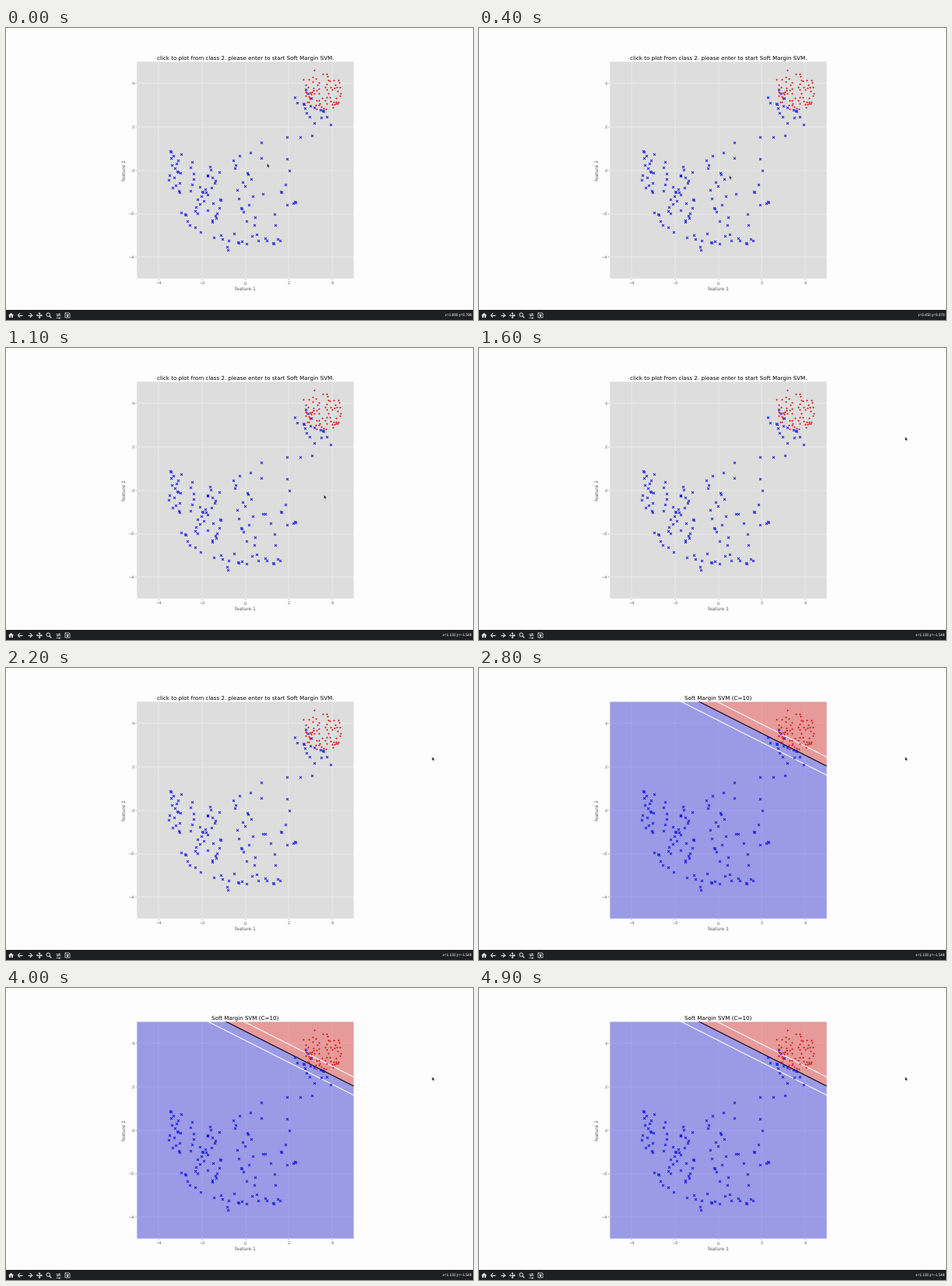
Animation of 600 by 375 pixels, one loop 5000 ms. Source, as a matplotlib script:

```python
import numpy as np
import matplotlib.pyplot as plt
from matplotlib.animation import FuncAnimation
from matplotlib.patches import Circle, Polygon, Rectangle

W, H, DPI = 600, 375, 100
PX = 72 / DPI            # points per pixel
U = 0.495 * PX           # scale of the plot's default font and line sizes
SIDE, LEFT, TOP = 278.74, 168.13, 43.44
UNIT = SIDE / 10
FRAMES, STEP = 50, 100
CLICK, SOLVED = 10, 28
BLUE, RED, GREY = "#0000e0", "#dc0808", "#555555"
ASK = "click to plot from class 2. please enter to start Soft Margin SVM."
RESULT = "Soft Margin SVM (C=10)"

plt.rcParams.update({
    "font.family": "DejaVu Sans",
    "text.hinting": "none",
    "axes.linewidth": U,
    "axes.labelpad": 4 * U,
    "axes.titlepad": 5 * U,
    "xtick.major.size": 3.5 * U, "ytick.major.size": 3.5 * U,
    "xtick.major.pad": 3.5 * U, "ytick.major.pad": 3.5 * U,
    "xtick.major.width": 0.8 * U, "ytick.major.width": 0.8 * U,
})
rng = np.random.default_rng(7)


def to_data(points):
    """Stage pixels to plot coordinates."""
    x, y = np.transpose(points)
    return (x - LEFT) / UNIT - 5, 5 - (y - TOP) / UNIT


def to_stage(x, y):
    return np.array([LEFT + (x + 5) * UNIT, TOP + (5 - y) * UNIT])


def strand(n, start, end, width):
    """Points in even steps along a segment, scattered to both sides."""
    start, end = np.array(start, float), np.array(end, float)
    along = end - start
    side = np.array([-along[1], along[0]]) / np.hypot(*along)
    t = (np.arange(n) + rng.uniform(0.2, 0.8, n)) / n
    off = width * (2 * (rng.permutation(n) + 0.5) / n - 1)
    return start + np.outer(t, along) + np.outer(off, side)


def disc(n, cx, cy, r, gap):
    """Random points in a circle that keep a minimum distance."""
    pts = []
    while len(pts) < n:
        p = rng.uniform(-r, r, 2)
        if np.hypot(*p) < r and all(np.hypot(*(p - q)) > gap for q in pts):
            pts.append(p)
    return np.array(pts) + [cx, cy]


blue = np.vstack([
    strand(17, (217, 156), (217, 210), 8),
    strand(6, (240, 167), (238, 215), 3),
    strand(8, (248, 203), (247, 242), 5),
    strand(6, (223, 234), (250, 265), 3),
    strand(20, (266, 176), (264, 250), 11),
    strand(6, (270, 264), (289, 285), 7),
    strand(12, (290, 269), (356, 274), 7),
    strand(18, (306, 157), (306, 255), 15),
    strand(7, (362, 158), (349, 265), 8),
    strand(16, (373, 85), (410, 118), 13),
    [(328, 147), (328, 167), (330, 213), (369, 225), (371, 223),
     (361, 139.5), (378, 139.5), (393, 137.5), (417, 124)],
])
blue = np.vstack([blue, blue[::8] + [0.8, 1.4]])
clicks = [(333, 213), (340, 225.5)]
red = np.vstack([disc(70, 408, 82, 25, 1.7), [(396, 54), (382, 66)]])

fig = plt.figure(figsize=(W / DPI, H / DPI), dpi=DPI, facecolor="#fdfdfd")
ax = fig.add_axes([LEFT / W, 1 - (TOP + SIDE) / H, SIDE / W, SIDE / H],
                  facecolor="#dddddd")
ticks = range(-4, 5, 2)
ax.set(xlim=(-5, 5), ylim=(-5, 5), xticks=ticks, yticks=ticks)
ax.set_axisbelow(True)
ax.grid(color="white", linewidth=0.8 * U)
ax.tick_params(color=GREY, labelcolor=GREY, labelsize=10 * U)
ax.spines[:].set_color("white")
ax.set_xlabel("feature 1", color=GREY, fontsize=12 * U)
ax.set_ylabel("feature 2", color=GREY, fontsize=12 * U)
title = ax.set_title(ASK, fontsize=14.4 * U)


def scatter(points, marker, color, width):
    return ax.scatter(*to_data(points), s=(6 * U) ** 2, marker=marker,
                      color=color, linewidths=width * U, zorder=3)


scatter(blue, "x", BLUE, 1.6)
added = scatter(clicks, "x", BLUE, 1.6)
scatter(red, ".", RED, 0.8)

# Decision regions, boundary and margins
SLOPE, CROSSING, MARGIN = -0.505, -0.87, 0.83


def boundary(x, shift=0):
    return 5 + SLOPE * (x - CROSSING - shift)


def region(corners, color):
    return ax.add_patch(Polygon(corners, color=color, alpha=0.3,
                                linewidth=0, zorder=1))


edge = [(5, boundary(5)), (CROSSING, 5)]
model = [region([(-5, 5), (-5, -5), (5, -5)] + edge, "blue"),
         region([(5, 5)] + edge, "red")]
ends = np.array([-5, 5])
for shift in (-MARGIN, 0, MARGIN):
    model += ax.plot(ends, boundary(ends, shift), zorder=2,
                     color="white" if shift else "black",
                     linewidth=2.2 * U)

# Layer in stage pixels for the toolbar and the pointer
stage = fig.add_axes([0, 0, 1, 1], zorder=5)
stage.set(xlim=(0, W), ylim=(H, 0))
stage.axis("off")
stage.add_patch(Rectangle((0, 362), W, 13, color="#1e1f21", linewidth=0))
INK, MID = "#e4e4e4", 369


def stroke(x, points, width=1.0):
    px, py = np.transpose(points)
    stage.plot(x + px, MID + py, color=INK, linewidth=width * PX,
               solid_capstyle="butt", solid_joinstyle="miter")


def shape(x, points):
    stage.add_patch(Polygon(np.array(points) + [x, MID], color=INK,
                            linewidth=0, zorder=3))


def home(x):
    shape(x, [(-3.7, 0.3), (0, -3.2), (3.7, 0.3)])
    for side in (-1, 1):
        shape(x, [(0.8 * side, 0), (2.6 * side, 0),
                  (2.6 * side, 3), (0.8 * side, 3)])


def arrow(x, way):
    stroke(x, [(-3 * way, 0), (3 * way, 0)])
    stroke(x, [(0.2 * way, -2.8), (3 * way, 0), (0.2 * way, 2.8)])


def move(x):
    head = np.array([(4, 0), (2.2, -1.6), (2.2, 1.6)])
    for a in np.arange(4) * np.pi / 2:
        turn = np.array([(np.cos(a), np.sin(a)), (-np.sin(a), np.cos(a))])
        shape(x, head @ turn)
        stroke(x, np.array([(0, 0), (3, 0)]) @ turn)


def lens(x):
    stage.add_patch(Circle((x - 0.8, MID - 0.8), 2.2, fill=False,
                           edgecolor=INK, linewidth=0.9 * PX))
    stroke(x, [(0.8, 0.8), (3.4, 3.4)], 1.2)


def sliders(x):
    for y, knob in ((-2.5, 1.3), (0, -1.3), (2.5, 0.5)):
        stroke(x, [(-3.4, y), (3.4, y)], 0.7)
        stroke(x, [(knob, y - 1), (knob, y + 1)])


def disk(x):
    stroke(x, [(-3, -3), (2, -3), (3, -2), (3, 3), (-3, 3), (-3, -3.4)], 0.8)
    stroke(x, [(-2, -1.4), (1.3, -1.4)], 1.2)
    stage.add_patch(Circle((x, MID + 1.2), 1, color=INK, linewidth=0))


home(6.5)
arrow(18.2, -1)
arrow(30.5, 1)
move(42.8)
lens(55)
sliders(67)
disk(79)
status = stage.text(598, MID, "", color="white", ha="right", va="center",
                    family="Liberation Sans", fontsize=4.6 * PX)

ARROW = np.array([(0, 0), (0, 4.9), (1.1, 4), (1.9, 5.7), (2.7, 5.3),
                  (1.9, 3.7), (3.4, 3.6)])
pointer = stage.add_patch(Polygon(ARROW, facecolor="black",
                                  edgecolor="white", linewidth=0.3 * PX,
                                  zorder=6))

# Pointer stops in plot coordinates
STOPS = [-1, 0, 1, 3, 6, 7, 9, 15]
STOP_X = [1.808, 1.005, 0.45, 0.45, 0.634, 1.076, 1.133, 8.61]
STOP_Y = [0.789, 0.316, 0.07, 0.07, -0.844, -1.263, -1.549, 2.468]


def hover(i):
    return np.interp(i, STOPS, STOP_X), np.interp(i, STOPS, STOP_Y)


def draw(i):
    pointer.set_xy(ARROW + to_stage(*hover(i)))
    # the readout runs one step late and stays at the last click
    x, y = hover(min(i, CLICK) - 1 if i > 3 else -1)
    status.set_text(f"x={x:.3f} y={y:.3f}".replace("-", "\u2212"))
    added.set_visible(i >= CLICK)
    solved = i >= SOLVED
    title.set_text(RESULT if solved else ASK)
    for part in model:
        part.set_visible(solved)


anim = FuncAnimation(fig, draw, frames=FRAMES, interval=STEP, repeat=True,
                     repeat_delay=0)
plt.show()
```
